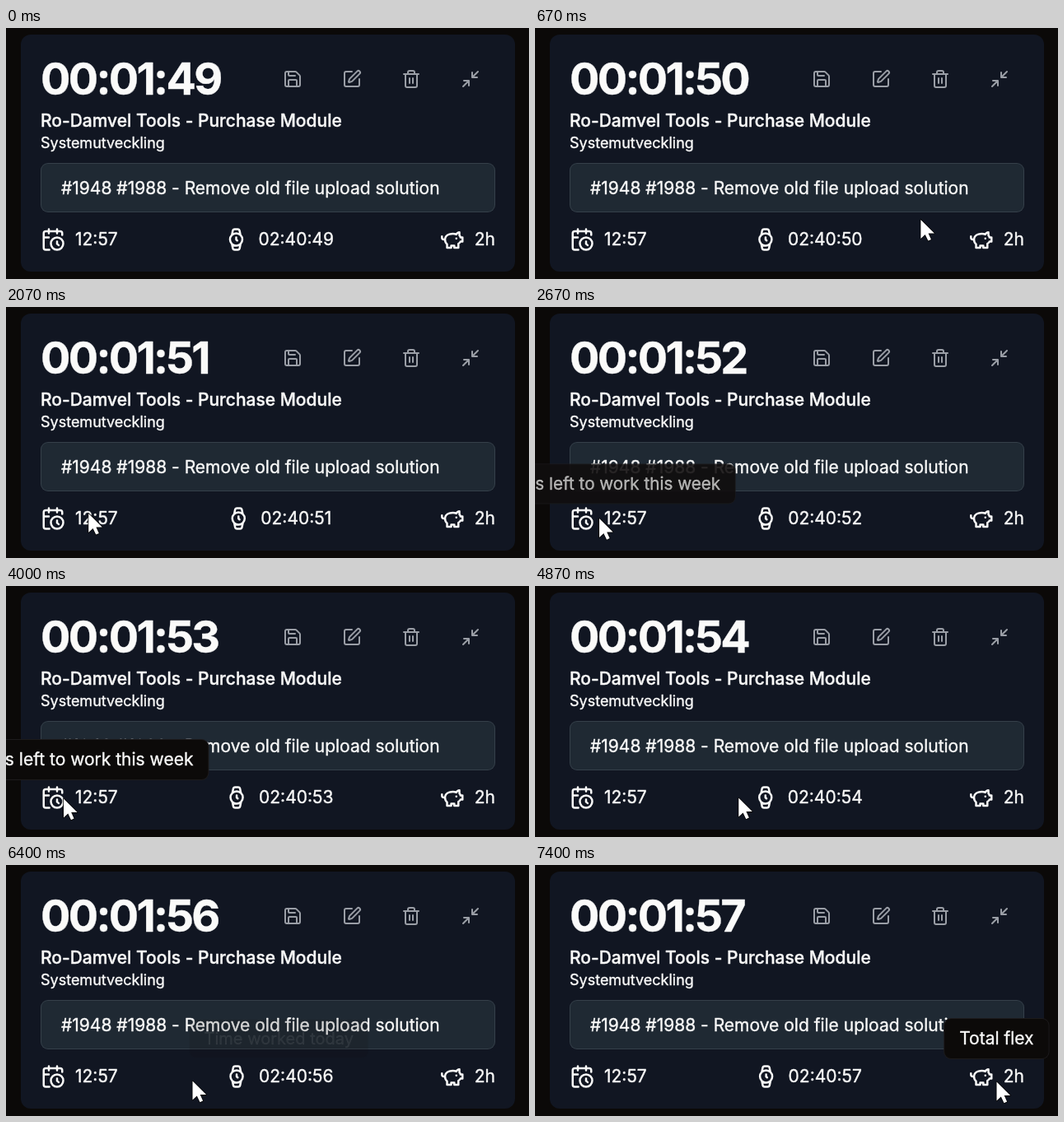
Write an HTML page with a canvas that moves like this. It is 635 px wide and 305 px high and loops after 8 s.

```html
<!DOCTYPE html>
<html lang="en">
<head>
<meta charset="utf-8">
<title>Time tracker</title>
<style>
  html, body { margin: 0; width: 100%; height: 100%; overflow: hidden; background: #0b0908; }
  canvas { display: block; width: 635px; height: 305px; }
</style>
</head>
<body>
<canvas id="stage" width="635" height="305"></canvas>
<script>
const ctx = document.getElementById('stage').getContext('2d');
const LOOP = 8000;
const STEP = 1000 / 15;
const UI = 1.5; // interface scale: fonts are given in unscaled pixels
const WHITE = '#fafaf9';
const MUTED = '#9a9ea6';

// Icon paths on a 24 x 24 grid
const icon = (...parts) => new Path2D(parts.join(' '));
const ring = (x, y, r) => `M${x - r} ${y}a${r} ${r} 0 1 0 ${2 * r} 0a${r} ${r} 0 1 0 ${-2 * r} 0`;
const ICONS = {
  save: icon('M15.2 3a2 2 0 0 1 1.4.6l3.8 3.8a2 2 0 0 1 .6 1.4V19a2 2 0 0 1-2 2H5a2 2 0 0 1-2-2V5a2 2 0 0 1 2-2z',
    'M17 21v-7a1 1 0 0 0-1-1H8a1 1 0 0 0-1 1v7', 'M7 3v4a1 1 0 0 0 1 1h7'),
  edit: icon('M12 3H5a2 2 0 0 0-2 2v14a2 2 0 0 0 2 2h14a2 2 0 0 0 2-2v-7',
    'M18.375 2.625a1 1 0 0 1 3 3l-9.013 9.014a2 2 0 0 1-.853.505l-2.873.84a.5.5 0 0 1-.62-.62l.84-2.873a2 2 0 0 1 .506-.852z'),
  trash: icon('M3 6h18', 'M19 6v14c0 1-1 2-2 2H7c-1 0-2-1-2-2V6',
    'M8 6V4c0-1 1-2 2-2h4c1 0 2 1 2 2v2', 'M10 11v6M14 11v6'),
  shrink: icon('M4 14h6v6M20 10h-6V4M14 10l7-7M3 21l7-7'),
  calendar: icon('M21 7.5V6a2 2 0 0 0-2-2H5a2 2 0 0 0-2 2v14a2 2 0 0 0 2 2h3.5',
    'M16 2v4M8 2v4M3 10h5M17.5 17.5L16 16.3V14', ring(16, 16, 6)),
  watch: icon(ring(12, 12, 6), 'M12 10v2l1 1',
    'M16.13 7.66l-.81-4.05a2 2 0 0 0-2-1.61h-2.68a2 2 0 0 0-2 1.61l-.78 4.05',
    'M7.88 16.36l.8 4a2 2 0 0 0 2 1.61h2.72a2 2 0 0 0 2-1.61l.81-4.05'),
  piggy: icon('M19 5c-1.5 0-2.8 1.4-3 2-3.5-1.5-11-.3-11 5 0 1.8 0 3 2 4.5V20h4v-2h3v2h4v-4c1-.5 1.7-1 2-2h2v-4h-2c0-1-.5-1.5-1-2V5z',
    'M2 9v1c0 1.1.9 2 2 2h1', 'M16 11h.01')
};
const ARROW = new Path2D('M0 0V23L5.3 18L9 25.7L12.6 24L9.2 16.6H16.6Z');

// Pointer path: time, x, y
const POINTER = [
  [130, 614, 288], [930, 380, 199], [1270, 190, 127], [1530, 150, 190], [1800, 118, 243],
  [2400, 84, 255], [2670, 77.5, 256.5], [3000, 69, 258], [3940, 69, 258], [4000, 69.5, 258],
  [4200, 150, 258], [4400, 244, 257], [4800, 244, 257], [4870, 247, 257], [5130, 302, 256],
  [6140, 302, 256], [6270, 274, 258], [6400, 226, 262], [6670, 232, 272], [6870, 232, 272],
  [7000, 372, 281], [7200, 540, 269], [7400, 560, 263]
];

const TIPS = [
  { text: 'Hours left to work this week', open: 2607, close: 4170 },
  { text: 'Time worked today', open: 5140, close: 6300 },
  { text: 'Total flex', open: 7200, close: Infinity }
];

const clamp = v => Math.min(1, Math.max(0, v));
const mix = (a, b, p) => a + (b - a) * p;

// The CSS "ease" curve, solved by bisection
function ease(x) {
  const bez = (a, b, s) => 3 * a * s * (1 - s) ** 2 + 3 * b * s * s * (1 - s) + s ** 3;
  let lo = 0, hi = 1;
  for (let i = 0; i < 20; i++) {
    const mid = (lo + hi) / 2;
    if (bez(0.25, 0.25, mid) < x) lo = mid; else hi = mid;
  }
  return bez(0.1, 1, hi);
}

// Monotone cubic through one column of the pointer path
function along(t, col) {
  const last = POINTER.length - 1;
  if (t >= POINTER[last][0]) return POINTER[last][col];
  const i = POINTER.findIndex((k, n) => t < POINTER[n + 1][0]);
  const slope = n => (POINTER[n + 1][col] - POINTER[n][col]) / (POINTER[n + 1][0] - POINTER[n][0]);
  const tangent = n => {
    if (n === 0) return slope(0);
    if (n === last) return 0;
    const a = slope(n - 1), b = slope(n);
    return a * b <= 0 ? 0 : 2 * a * b / (a + b);
  };
  const [a, b] = [POINTER[i], POINTER[i + 1]];
  const d = b[0] - a[0], s = (t - a[0]) / d, r = 1 - s;
  return a[col] * (1 + 2 * s) * r * r + tangent(i) * d * s * r * r
    + b[col] * s * s * (3 - 2 * s) - tangent(i + 1) * d * s * s * r;
}

function setFont(size, weight, spacing = 0) {
  ctx.font = `${weight} ${size}px Inter, sans-serif`;
  ctx.letterSpacing = spacing + 'px';
}

function textWidth(str, size, weight) {
  setFont(size, weight);
  return ctx.measureText(str).width * UI;
}

// A hairline stroke gives the text its slightly heavy rendering
function label(str, x, y, size, weight, spacing) {
  ctx.save();
  ctx.translate(x, y);
  ctx.scale(UI, UI);
  setFont(size, weight, spacing);
  ctx.fillStyle = ctx.strokeStyle = WHITE;
  ctx.lineWidth = 0.25;
  ctx.lineJoin = 'round';
  ctx.fillText(str, 0, 0);
  ctx.strokeText(str, 0, 0);
  ctx.restore();
}

function box(x, y, w, h, r, fill, border) {
  ctx.beginPath();
  ctx.roundRect(x, y, w, h, r);
  ctx.fillStyle = border || fill;
  ctx.fill();
  if (!border) return;
  ctx.beginPath();
  ctx.roundRect(x + 1, y + 1, w - 2, h - 2, r - 1);
  ctx.fillStyle = fill;
  ctx.fill();
}

function drawIcon(name, x, y, size, color) {
  ctx.save();
  ctx.translate(x, y);
  ctx.scale(size / 24, size / 24);
  ctx.lineWidth = 2;
  ctx.lineCap = ctx.lineJoin = 'round';
  ctx.strokeStyle = color;
  ctx.stroke(ICONS[name]);
  ctx.restore();
}

// Three icon-and-text groups, spread across the row; returns their centres
function drawStats(seconds) {
  const stats = [['calendar', '12:57'], ['watch', '02:40:' + seconds], ['piggy', '2h']];
  const widths = stats.map(s => 42 + textWidth(s[1], 14, 400));
  const gap = (552 - widths.reduce((a, b) => a + b)) / 2;
  let x = 42;
  return stats.map(([name, str], i) => {
    drawIcon(name, x, 242, 30, WHITE);
    label(str, x + 42, 264, 14, 400);
    const centre = x + widths[i] / 2;
    x += widths[i] + gap;
    return centre;
  });
}

function drawTip({ text, open, close }, t, cx) {
  if (t < open || t > close + 150) return;
  const leaving = t >= close;
  const p = leaving ? 1 - ease(clamp((t - close) / 150)) : ease(clamp((t - open) / 150));
  const w = textWidth(text, 14, 400) + 38;
  const scale = mix(0.95, 1, p);
  ctx.save();
  ctx.globalAlpha = p;
  ctx.translate(cx, 211 + (leaving ? 0 : 12 * (1 - p)));
  ctx.scale(scale, scale);
  box(-w / 2, -25, w, 50, 9, '#0c0a09', '#1d1b1c');
  label(text, 19 - w / 2, 7, 14, 400);
  ctx.restore();
}

function drawPointer(t) {
  if (t < 130) return;
  ctx.save();
  ctx.translate(along(t, 1) + 0.5, along(t, 2) + 0.5);
  ctx.lineWidth = 1.5;
  ctx.lineJoin = 'round';
  ctx.strokeStyle = '#000';
  ctx.stroke(ARROW);
  ctx.fillStyle = '#fff';
  ctx.fill(ARROW);
  ctx.restore();
}

function draw(t) {
  const seconds = 49 + Math.floor((t + 600) / 1000);
  ctx.fillStyle = '#0b0908';
  ctx.fillRect(0, 0, 635, 305);
  box(18, 8, 600, 288, 12, '#111622');

  label('00:01:' + seconds, 42, 81, 36, 700, -1.8);
  ['save', 'edit', 'trash', 'shrink'].forEach((name, i) => drawIcon(name, 336 + 72 * i, 50, 24, MUTED));
  label('Ro-Damvel Tools - Purchase Module', 42, 120, 14, 500);
  label('Systemutveckling', 42, 146, 12, 400);

  box(42, 164, 552, 60, 9, '#1f2933', '#35404a');
  label('#1948 #1988 - Remove old file upload solution', 67, 202, 14, 400);

  const centres = drawStats(seconds);
  TIPS.forEach((tip, i) => drawTip(tip, t, centres[i]));
  drawPointer(t);
}

const start = performance.now();
function tick() {
  const t = (performance.now() - start) % LOOP;
  draw(Math.floor((t + 4) / STEP) * STEP);
  requestAnimationFrame(tick);
}
tick();
</script>
</body>
</html>
```
